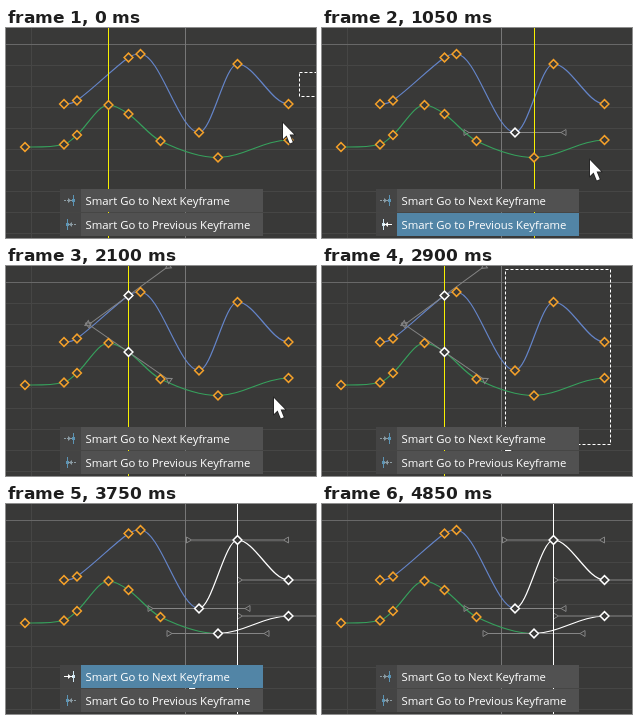
Recreate the animation shown at these times as an HTML page with a canvas. Size 310 by 210 pixels, loop 5 s.

```html
<!DOCTYPE html>
<html lang="en">
<head>
<meta charset="utf-8">
<title>Smart keyframe navigation</title>
<style>
  html, body { margin: 0; overflow: hidden; background: #393938; }
  canvas { display: block; }
</style>
</head>
<body>
<canvas id="stage" width="310" height="210"></canvas>
<script>
const ctx = document.getElementById('stage').getContext('2d');
const LOOP = 5000, STEP = 50, HANDLE = 51;

const curves = [
  { color: '#6484c8', keys: [[58, 76], [71, 72.5], [122.5, 29.5], [134.5, 26], [193, 104.5], [231.5, 36], [282.5, 76]] },
  { color: '#36a05c', keys: [[19, 119], [58, 116.5], [71, 107], [102.5, 77], [122.5, 86], [154.5, 113], [212, 129.5], [282.5, 112]] }
];
const rows = [
  { y: 161, label: 'Smart Go to Next Keyframe' },
  { y: 185.5, label: 'Smart Go to Previous Keyframe' }
];
const NEXT = 0, PREV = 1, NONE = -1;

// Each entry changes part of the state from its time on.
const events = [
  [0, { head: 102, lit: NONE, sel: null }],
  [200, { sel: [282, 283] }],
  [300, { lit: PREV }],
  [450, { sel: [231, 232] }],
  [550, { head: 231 }],
  [600, { lit: NONE }],
  [700, { lit: PREV }],
  [800, { sel: [212, 213] }],
  [900, { head: 212 }],
  [950, { lit: NONE }],
  [1000, { lit: PREV }],
  [1050, { sel: [193, 194] }],
  [1150, { head: 193, lit: NONE }],
  [1200, { sel: [154, 155], lit: PREV }],
  [1250, { head: 154, lit: NONE }],
  [1300, { sel: [134, 135], lit: PREV }],
  [1350, { head: 134, sel: [122, 123] }],
  [1450, { lit: NONE }],
  [1600, { head: 122 }],
  [3000, { sel: null }],
  [3050, { sel: [190, 290] }],
  [3250, { lit: NEXT }],
  [3450, { head: 193 }],
  [3500, { lit: NONE }],
  [3600, { lit: NEXT }],
  [3650, { head: 212 }],
  [3750, { head: 231 }],
  [3900, { lit: NONE }],
  [3950, { lit: NEXT }],
  [4000, { head: 282 }],
  [4050, { lit: NONE }],
  [4100, { lit: NEXT }],
  [4150, { head: 193 }],
  [4200, { lit: NONE }],
  [4250, { head: 212, lit: NEXT }],
  [4350, { lit: NONE }],
  [4400, { head: 231, lit: NEXT }],
  [4450, { head: 282, lit: NONE }],
  [4600, { head: 193, lit: NEXT }],
  [4650, { lit: NONE }],
  [4700, { head: 212, lit: NEXT }],
  [4750, { lit: NONE }],
  [4800, { head: 231, lit: NEXT }],
  [4850, { lit: NONE }]
];

const cursorPath = [
  [-50, 293, 68], [0, 277, 95], [100, 270, 125], [150, 268, 132],
  [1700, 268, 132], [1750, 270, 128], [1800, 268, 132],
  [2100, 268, 132], [2150, 269, 136], [2600, 288, 3], [2650, 288, 3], [2850, 183, 178]
];
const marquees = [
  { from: 0, to: 200, x: 316, y: 44 },
  { from: 2700, to: 3000, x: 288, y: 3 }
];

function cursorAt(t) {
  const i = cursorPath.findIndex(p => p[0] > t);
  if (i < 0) return cursorPath[cursorPath.length - 1].slice(1);
  const a = cursorPath[i - 1], b = cursorPath[i], k = (t - a[0]) / (b[0] - a[0]);
  return [a[1] + (b[1] - a[1]) * k, a[2] + (b[2] - a[2]) * k];
}

// Flat at ends and extremes, otherwise the slope between both neighbours.
function slope(keys, i) {
  const a = keys[i - 1], k = keys[i], b = keys[i + 1];
  if (!a || !b || (k[1] - a[1]) * (b[1] - k[1]) <= 0) return 0;
  return (b[1] - a[1]) / (b[0] - a[0]);
}

function path(points, close) {
  ctx.beginPath();
  points.forEach(p => ctx.lineTo(p[0], p[1]));
  if (close) ctx.closePath();
}

function line(color, ...points) {
  ctx.strokeStyle = color;
  path(points);
  ctx.stroke();
}

function rect(color, x, y, w, h) {
  ctx.fillStyle = color;
  ctx.fillRect(x, y, w, h);
}

function drawGrid() {
  rect('#393938', 0, 0, 310, 210);
  for (let y = 37; y < 210; y += 21) rect('#464645', 0, y, 310, 1);
  rect('#464645', 25, 0, 1, 210);
  rect('#686868', 0, 16, 310, 1);
  rect('#777', 179, 0, 1, 210);
}

function drawCurve({ color, keys }, selected) {
  ctx.lineWidth = 1.2;
  for (let i = 1; i < keys.length; i++) {
    const a = keys[i - 1], b = keys[i], d = (b[0] - a[0]) / 3;
    ctx.strokeStyle = selected(a) && selected(b) ? '#fff' : color;
    ctx.beginPath();
    ctx.moveTo(...a);
    ctx.bezierCurveTo(a[0] + d, a[1] + d * slope(keys, i - 1),
      b[0] - d, b[1] - d * slope(keys, i), ...b);
    ctx.stroke();
  }
}

function drawHandles([x, y], tilt) {
  ctx.save();
  ctx.translate(x, y);
  ctx.rotate(Math.atan(tilt));
  ctx.lineWidth = 1;
  line('#858585', [-HANDLE + 5, 0], [HANDLE - 5, 0]);
  for (const s of [-1, 1]) {
    path([[s * HANDLE, -3], [s * HANDLE, 3], [s * (HANDLE - 5), 0]], true);
    ctx.stroke();
  }
  ctx.restore();
}

function drawKey([x, y], color) {
  const r = 4.4;
  path([[x - r, y], [x, y - r], [x + r, y], [x, y + r]], true);
  ctx.fillStyle = '#393938';
  ctx.fill();
  ctx.lineWidth = 1.5;
  ctx.strokeStyle = color;
  ctx.stroke();
}

function drawMarquee(t) {
  const box = marquees.find(m => t >= m.from && t < m.to);
  if (!box) return;
  const [x, y] = cursorAt(t - STEP).map(Math.round);
  ctx.setLineDash([3, 2]);
  ctx.lineWidth = 1;
  ctx.strokeStyle = '#fff';
  ctx.strokeRect(x + .5, box.y + .5, box.x - x, y - box.y);
  ctx.setLineDash([]);
}

function drawCursor([x, y]) {
  const shape = [[0, 0], [0, 16], [3.6, 12.6], [6.8, 20.5], [9.8, 19.2], [6.6, 11.6], [11.2, 11.6]];
  path(shape.map(p => [x + p[0], y + p[1]]), true);
  ctx.lineWidth = 1.5;
  ctx.strokeStyle = '#222';
  ctx.stroke();
  ctx.fillStyle = '#fff';
  ctx.fill();
}

function drawIcon(row, y, lit) {
  const blue = lit ? '#cfe6f2' : '#5c94b4', gray = lit ? '#fff' : '#8c9ca4';
  const tick = row === NEXT ? 67 : 61, tip = row === NEXT ? 58 : 70;
  const dir = Math.sign(tick - tip);
  rect(blue, tick, y - 5, 1, 11);
  rect(blue, tick - 1, y - 1, 3, 3);
  ctx.lineWidth = 1;
  ctx.setLineDash(lit ? [] : [2, 1]);
  line(gray, [tip, y + .5], [tick, y + .5]);
  ctx.setLineDash([]);
  path([[tick - dir * 2, y + .5], [tick - dir * 5, y - 2], [tick - dir * 5, y + 3]], true);
  ctx.fillStyle = gray;
  ctx.fill();
}

function drawMenu(lit) {
  ctx.font = '11.35px "Open Sans", sans-serif';
  rows.forEach(({ y, label }, i) => {
    const top = Math.floor(y);
    rect('#444', 54, top, 21, 23);
    rect(lit === i ? '#5285a6' : '#515151', 75, top, 182, 23);
    drawIcon(i, top + 11, lit === i);
    ctx.fillStyle = '#fff';
    ctx.fillText(label, 79.5, top + 16);
  });
}

function draw(t) {
  const state = Object.assign({}, ...events.filter(e => e[0] <= t).map(e => e[1]));
  const selected = ([x]) => !!state.sel && x >= state.sel[0] && x <= state.sel[1];

  drawGrid();
  curves.forEach(c => drawCurve(c, selected));
  for (const { keys } of curves)
    keys.forEach((k, i) => selected(k) && drawHandles(k, slope(keys, i)));
  rect(t > 3000 && state.head === 231 ? '#fff' : '#f8f000', state.head, 0, 1, 210);
  for (const { keys } of curves)
    keys.forEach(k => drawKey(k, selected(k) ? '#fff' : '#f5a12a'));
  drawMarquee(t);
  if (t < 4800) drawCursor(cursorAt(t));
  drawMenu(state.lit);
}

function frame() {
  const t = performance.now() % LOOP;
  draw(Math.floor(t / STEP) * STEP);
  requestAnimationFrame(frame);
}
frame();
</script>
</body>
</html>
```
